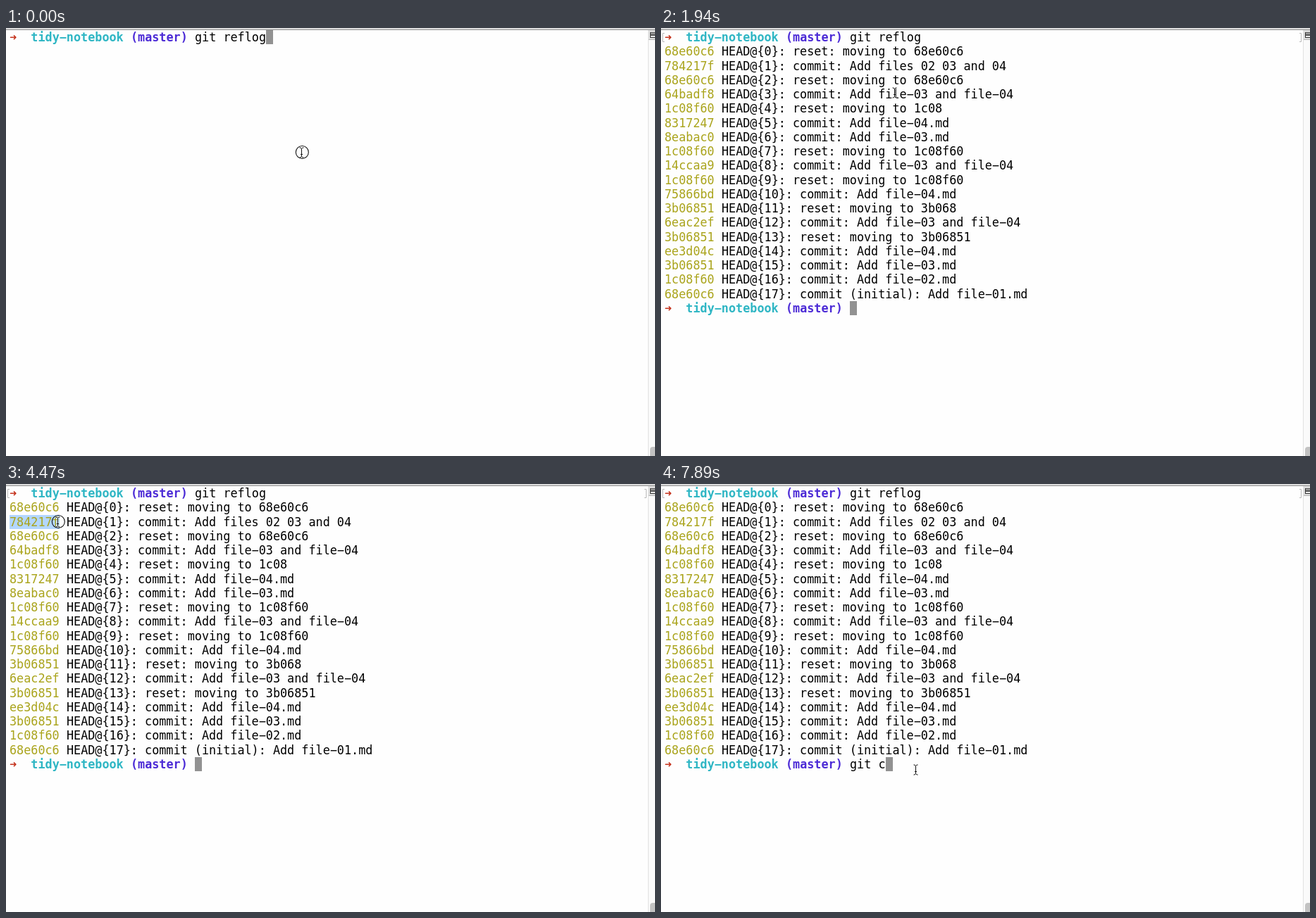
Recreate the animation shown at these times as an HTML page with a canvas. Size 921 px wide and 608 px high, loop 8 s.

```html
<!DOCTYPE html>
<html lang="en">
<head>
<meta charset="utf-8">
<title>Terminal</title>
<style>
  html, body { margin: 0; width: 100%; height: 100%; overflow: hidden; background: #fefefe; }
  canvas { display: block; }
</style>
</head>
<body>
<canvas id="stage" width="921" height="608"></canvas>
<script>
const ctx = document.getElementById('stage').getContext('2d');
const W = 921, H = 608, LOOP = 8000;
const LEFT = 5, TOP = 3, COL = 10.115, ROW = 20.26;
const FONT = '16.8px "DejaVu Sans Mono", monospace';
const COLOR = {
  paper: '#fefefe', ink: '#000', arrow: '#c4321c', folder: '#2fb6c4',
  branch: '#4c2bd6', hash: '#aaa41c', block: '#929292', select: '#b3d7ff'
};

const LOG = `68e60c6 reset: moving to 68e60c6
784217f commit: Add files 02 03 and 04
68e60c6 reset: moving to 68e60c6
64badf8 commit: Add file-03 and file-04
1c08f60 reset: moving to 1c08
8317247 commit: Add file-04.md
8eabac0 commit: Add file-03.md
1c08f60 reset: moving to 1c08f60
14ccaa9 commit: Add file-03 and file-04
1c08f60 reset: moving to 1c08f60
75866bd commit: Add file-04.md
3b06851 reset: moving to 3b068
6eac2ef commit: Add file-03 and file-04
3b06851 reset: moving to 3b06851
ee3d04c commit: Add file-04.md
3b06851 commit: Add file-03.md
1c08f60 commit: Add file-02.md
68e60c6 commit (initial): Add file-01.md`.split('\n');
const LAST = LOG.length + 1;

// Evenly timed, eased pointer positions
function glide(start, steps, x0, y0, x1, y1) {
  return Array.from({ length: steps }, (_, i) => {
    const u = (i + 1) / steps, e = u * u * (3 - 2 * u);
    return [start + i * 150, x0 + (x1 - x0) * e, y0 + (y1 - y0) * e];
  });
}

// Time, x, y
const POINTER = [
  [0, 419, 177], [1040, 422, 182], [1190, 426, 189],
  [1490, 435, 194], [1640, 416, 170], [1790, 376, 130], [1940, 331, 92],
  [2090, 282, 72], [2240, 242, 61], [2390, 224, 58],
  [2540, 186, 50], [2690, 132, 43], [2840, 80, 43], [2990, 38, 47],
  [3140, 12, 50], [3290, 2, 50], [3430, 4, 52], [3580, 6, 54],
  ...glide(3720, 6, 6, 54, 73, 54),
  ...glide(5070, 7, 73, 54, 366, 373),
  [6120, 361, 406]
];
const TYPED = [[0, ''], [7450, 'g'], [7600, 'git'], [7750, 'git '], [7890, 'git c']];

const at = (keys, t) => keys.findLast(k => k[0] <= t);
const within = (t, a, b) => t >= a && t < b;
const colX = col => LEFT + col * COL;
const rowY = row => Math.round(TOP + row * ROW);

function box(color, x, y, w, h) {
  ctx.fillStyle = color;
  ctx.fillRect(x, y, w, h);
}

function line(...points) {
  ctx.beginPath();
  points.forEach(([x, y]) => ctx.lineTo(x, y));
  ctx.stroke();
}

// The minus sign gives the terminal's wide hyphen
function text(str, col, row, color, bold) {
  ctx.font = (bold ? 'bold ' : '') + FONT;
  ctx.fillStyle = color;
  ctx.fillText(str.replace(/-/g, '\u2212'), colX(col), rowY(row) + 16);
}

function prompt(row, command) {
  text('\u279c', 0, row, COLOR.arrow, true);
  text('tidy-notebook', 3, row, COLOR.folder, true);
  text('(master)', 17, row, COLOR.branch, true);
  text(command, 26, row, COLOR.ink);
}

function block(col, row) {
  box(COLOR.block, Math.round(colX(col)), rowY(row), 10, 20);
}

function chrome() {
  box(COLOR.paper, 0, 0, W, H);
  box('#fafafa', 911, 3, 10, H);
  box('#e2e2e2', 911, 3, 1, H);
  box('#dcdcdc', 0, 0, W, 2);
  box('#8f8f8f', 0, 2, W, 1);
  box('#dedede', 912, 3, 9, 14);
  box('#b5b5b5', 912, 16, 9, 1);
  box('#333', 914, 6, 7, 8);
  box('#eee', 915, 7, 6, 1);
  box('#aaa', 915, 9, 6, 1);
  box('#eee', 915, 11, 6, 2);
  ctx.fillStyle = '#c2c2c2';
  ctx.beginPath();
  ctx.roundRect(914, 595, 10, 20, 4);
  ctx.fill();
}

function brackets() {
  ctx.strokeStyle = '#b8b8b8';
  ctx.lineWidth = 1;
  line([5, 7.5], [2.5, 7.5], [2.5, 19.5], [5, 19.5]);
  line([906, 7.5], [908.5, 7.5], [908.5, 19.5], [906, 19.5]);
}

function beam(x, y) {
  const draw = () => {
    for (const s of [-1, 1]) {
      line([-3, s * 7], [-1.5, s * 7], [0, s * 5.5], [1.5, s * 7], [3, s * 7]);
    }
    line([0, -6], [0, 6]);
    line([-1.5, 2.5], [1.5, 2.5]);
  };
  ctx.save();
  ctx.translate(Math.round(x) + 0.5, Math.round(y));
  ctx.strokeStyle = 'rgba(255,255,255,.7)';
  ctx.lineWidth = 2.4;
  draw();
  ctx.strokeStyle = '#111';
  ctx.lineWidth = 1;
  draw();
  ctx.restore();
}

function edgeArrow(y) {
  ctx.beginPath();
  [[0, -1], [3, -1], [3, -3.5], [7, 0.5], [3, 4], [3, 2], [0, 2]]
    .forEach(([dx, dy]) => ctx.lineTo(dx, y + dy));
  ctx.closePath();
  ctx.strokeStyle = '#fff';
  ctx.lineWidth = 1.5;
  ctx.stroke();
  ctx.fillStyle = '#000';
  ctx.fill();
}

function ring(x, y) {
  ctx.strokeStyle = '#111';
  ctx.lineWidth = 1.1;
  ctx.beginPath();
  ctx.arc(x + 1.3, y - 0.5, 9, 0, Math.PI * 2);
  ctx.stroke();
}

function pointer(t, x, y) {
  if (within(t, 3290, 3430)) edgeArrow(y);
  else beam(x, y);
  if (t < 150 || within(t, 3720, 4770) || within(t, 6270, 6560)) ring(x, y);
}

function render(t) {
  const [, x, y] = at(POINTER, t);
  chrome();
  if (t < 150) {
    block(36, 0);
  } else {
    brackets();
    if (within(t, 3720, 6270)) {
      const chars = Math.min(7, Math.round((x - LEFT) / COL));
      box(COLOR.select, LEFT, rowY(2), Math.round(chars * COL), 20);
    }
    LOG.forEach((entry, i) => {
      text(entry.slice(0, 7), 0, i + 1, COLOR.hash);
      text(`HEAD@{${i}}: ${entry.slice(8)}`, 8, i + 1, COLOR.ink);
    });
    if (t < 300) {
      block(0, LAST);
    } else {
      const command = at(TYPED, t)[1];
      block(26 + command.length, LAST);
      prompt(LAST, command);
    }
  }
  prompt(0, 'git reflog');
  pointer(t, x, y);
}

const began = performance.now();
function tick() {
  render((performance.now() - began) % LOOP);
  requestAnimationFrame(tick);
}
tick();
</script>
</body>
</html>
```
